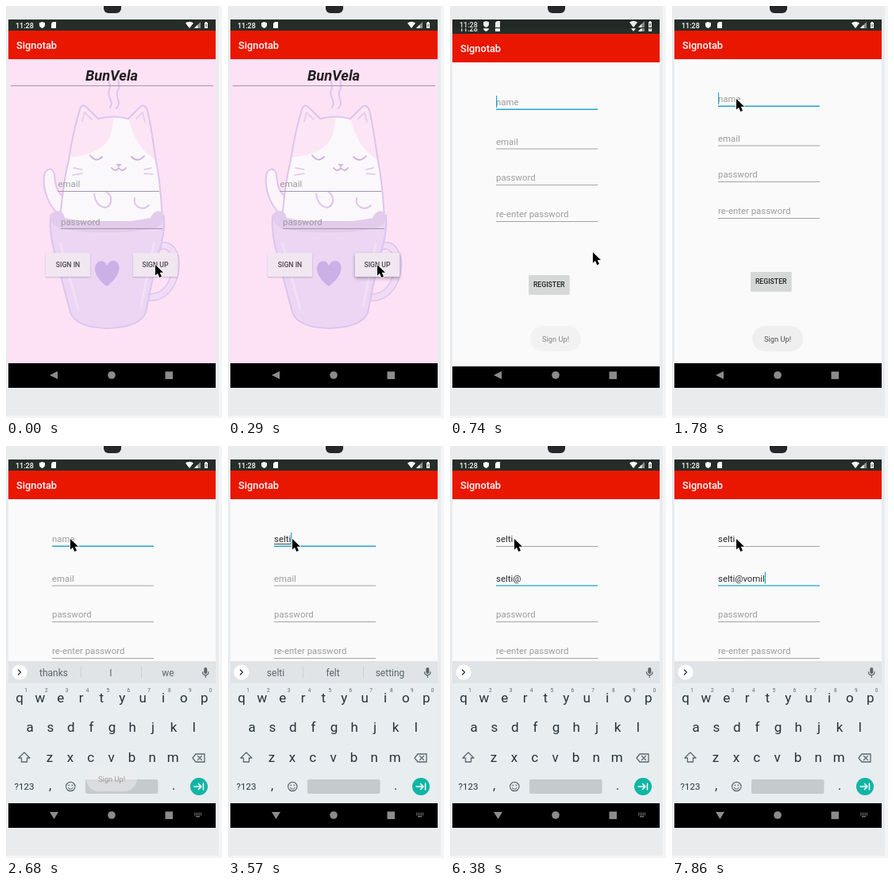
These frames come from a looping animation (272x519 px, 8000 ms). An HTML page with a canvas:

```html
<!DOCTYPE html>
<html lang="en">
<head>
<meta charset="utf-8">
<title>Sign up</title>
<style>
html, body { margin: 0; width: 100%; height: 100%; overflow: hidden; background: #ebedef; }
canvas { display: block; width: 272px; height: 519px; }
</style>
</head>
<body>
<canvas id="stage"></canvas>
<script>
const W = 272, H = 519, LOOP = 8000;
const canvas = document.getElementById('stage');
const ctx = canvas.getContext('2d');
const dpr = window.devicePixelRatio || 1;
canvas.width = W * dpr;
canvas.height = H * dpr;

const TICKS = [0, 290, 590, 740, 890, 1040, 1190, 1340, 1480, 1780, 1930, 2080,
  2380, 2530, 2680, 2830, 2980, 3120, 3270, 3420, 3570, 3860, 4310, 4600, 4750,
  4900, 5050, 5190, 5640, 5780, 6380, 6680, 7130, 7280, 7430, 7570, 7860];
const NAME = 'selti', MAIL = 'selti@vomil';
const NAME_KEYS = [2980, 3120, 3270, 3420, 3570];
const MAIL_KEYS = [4600, 4750, 4900, 5050, 5190, 5780, 6680, 7280, 7430, 7570, 7860];
const OPEN = 590, TAP = 1780, NEXT = 3860;
const ACTIONS = [OPEN, TAP, ...NAME_KEYS, NEXT, ...MAIL_KEYS];
const WORDS = ['thanks I we', 'she so said', 'see set send', 'self sell sets',
  'selt belt felt', 'selti felt setting'];
const HINT = '#9c9c9c', INK = '#263238', BLUE = '#22a6cf', TEAL = '#10b5a4';

const clamp = v => Math.max(0, Math.min(1, v));
const past = (list, t) => list.filter(k => k <= t);
const last = list => list[list.length - 1];

function rect(x, y, w, h, fill) {
  ctx.fillStyle = fill;
  ctx.fillRect(x, y, w, h);
}

function round(x, y, w, h, r, fill) {
  ctx.beginPath();
  ctx.roundRect(x, y, w, h, r);
  ctx.fillStyle = fill;
  ctx.fill();
}

function disc(x, y, r, fill) {
  ctx.beginPath();
  ctx.arc(x, y, r, 0, 7);
  ctx.fillStyle = fill;
  ctx.fill();
}

function shape(d, fill, stroke, width = 1) {
  const p = new Path2D(d);
  if (fill) { ctx.fillStyle = fill; ctx.fill(p); }
  if (stroke) {
    ctx.strokeStyle = stroke;
    ctx.lineWidth = width;
    ctx.stroke(p);
  }
}

function text(s, x, y, size, color, align = 'left', style = '400') {
  ctx.font = `${style} ${size}px Roboto, "Noto Sans", sans-serif`;
  ctx.textAlign = align;
  ctx.fillStyle = color;
  ctx.fillText(s, x, y);
  return ctx.measureText(s).width;
}

function bezel() {
  rect(0, 0, W, H, '#e9ebed');
  rect(268, 0, 4, H, '#f4f5f6');
  rect(0, 516, W, 3, '#f3f4f5');
  round(123, -6, 22, 15, 6, '#25272a');
}

function navBar(keyboard) {
  const c = '#8c8c8c';
  rect(3, 450, 261, 31, '#000');
  shape(keyboard ? 'M55 461H66L60.500 470Z' : 'M65 460V470L55 465Z', c);
  disc(133, 465, 4.8, c);
  rect(200.5, 460.5, 9.5, 9.5, c);
  if (!keyboard) return;
  for (let i = 0; i < 10; i++) {
    rect(237 + i % 5 * 2, 462 + Math.floor(i / 5) * 2, 1.2, 1.2, c);
  }
  rect(239, 466.2, 5, 1.2, c);
}

function appBar() {
  rect(3, 17, 261, 14, '#252d28');
  text('11:28', 12, 27.500, 9, '#fff', 'left', '500');
  shape('M45.500 20L49 21.300V24C49 26 47.500 27.300 45.500 28C43.500 27.300 42 26 42 24V21.300Z', '#fff');
  shape('M59 20H63V28H57V22Z', '#fff');
  shape('M226 21.500Q231 18 236 21.500L231 28Z', '#fff');
  shape('M245 20V28H237Z', '#8b918d');
  shape('M241.500 23.500V28H237Z', '#fff');
  rect(250, 21, 4, 7, '#fff');
  rect(251, 20, 2, 1, '#fff');
  rect(251.5, 23, 1, 3, '#252d28');
  rect(3, 31, 261, 36, '#e91700');
  text('Signotab', 13, 54, 12.8, '#fff', 'left', '500');
}

function catCup() {
  const line = '#dcc5ec', cup = '#ecd6f4';
  ctx.lineCap = ctx.lineJoin = 'round';
  shape('M131 128C137 120 126 114 130 106C132 101 131 98 129 94M139 129C147 121 136 114 141 106C144 101 142 97 141 93', null, line, 2);
  shape('M66 262C54 252 46 232 48 214C50 203 60 203 61 213C62 225 64 234 72 240', '#fbf4fb', line, 2);
  shape('M190 304C207 296 217 312 213 335C209 357 195 368 180 367', null, line, 10);
  shape('M190 304C207 296 217 312 213 335C209 357 195 368 180 367', null, '#f2dcf5', 7);
  const body = 'M68 272C70 240 74 215 79 194C82 174 87 150 93 130Q96 122 102 128L116 142Q135 137 154 142L168 128Q174 122 178 131C183 152 186 176 189 196C194 220 196 248 197 272Z';
  shape(body, '#fbf8fb');
  ctx.save();
  ctx.clip(new Path2D(body));
  shape('M70 110H134Q140 160 123 176Q101 192 74 190Z', '#fce5f4');
  shape('M154 110H200V199Q166 188 154 142Z', '#fce5f4');
  ctx.restore();
  shape(body, null, line, 2);
  shape('M96 145L99 134L108 143M164 142L172 134L175 146', null, '#e6d0ee', 2);
  shape('M106 188Q113 198 121 190M158 190Q166 198 174 189M133 204Q138 210 142 204Q147 210 151 204', null, '#cbb1dc', 1.800);
  shape('M138 199H146L142 203Z', '#d5b5e2');
  shape('M85 204L96 206M84 213L96 211M183 204L174 206M185 212L174 211', null, line, 1.300);
  shape('M111 237C113 255 130 259 132 246Q133 238 126 234M162 242C160 253 172 259 180 251', null, line, 2);
  shape('M56 264Q127 286 199 264Q201 289 190 317L176 386Q169 405 127 406Q88 405 81 386L63 317Q54 287 56 264Z', cup, line, 2);
  shape('M55 264C62 255 72 256 74 267Q127 278 182 267C188 254 198 257 199 267Q197 279 182 281Q127 290 72 281Q57 278 55 264Z', '#e3cbed');
  shape('M69 300L91 382M186 300L170 378', null, '#f2e0f7', 3);
  shape('M127 353C111 342 108 327 117 322Q124 319 127 327Q132 318 139 322C147 329 141 343 127 353Z', '#cbb0e7');
}

function loginButton(label, x, pressed) {
  ctx.save();
  ctx.shadowColor = `rgba(60,40,70,${pressed ? .42 : .26})`;
  ctx.shadowBlur = (pressed ? 4 : 2) * dpr;
  ctx.shadowOffsetY = (pressed ? 2 : 1) * dpr;
  round(x, 311, 56, 30, 1, '#f0e7f1');
  ctx.restore();
  text(label, x + 28, 329, 8.700, '#4b474c', 'center', '500');
}

function loginScreen(t) {
  rect(3, 67, 261, 384, '#fde2f6');
  catCup();
  text('BunVela', 133, 94, 18.300, '#211e22', 'center', 'italic 700');
  rect(6, 100, 255, 1, '#a694a3');
  text('email', 65.500, 228, 11.400, HINT);
  rect(65, 233, 128, 1, '#a596a4');
  text('password', 69, 276, 11.400, HINT);
  rect(69, 280, 128, 1, '#a596a4');
  loginButton('SIGN IN', 50, false);
  loginButton('SIGN UP', 160, t >= 290);
  appBar();
}

function field(hint, value, y, focused, caret, composing) {
  const w = text(value || hint, 58, y - 5, 11.400, value ? '#2b2b2b' : HINT);
  const end = value ? w : 0;
  if (composing && value) rect(58, y - 3, w, 1, '#444');
  rect(58, y, 128, 1, focused ? BLUE : '#a3a3a3');
  if (focused) rect(58, y - .5, 128, .5, BLUE);
  if (focused && caret) rect(58 + end, y - 17, 1.200, 15, BLUE);
}

function formScreen(t) {
  const name = NAME.slice(0, past(NAME_KEYS, t).length);
  const mail = MAIL.slice(0, past(MAIL_KEYS, t).length);
  const idle = t - (last(past(ACTIONS, t)) || 0);
  const caret = Math.floor((idle + 60) / 500) % 2 === 0;
  const onMail = t >= NEXT;
  rect(3, 67, 261, 383, '#fafafa');
  field('name', name, 126, !onMail, caret, !onMail);
  field('email', mail, 175.500, onMail, caret, t < 5780);
  field('password', '', 221, false);
  field('re-enter password', '', 267, false);
  round(99, 335.500, 51.500, 24.500, 1, 'rgba(0,0,0,.12)');
  round(99, 335, 51.500, 24, 1, '#d6d7d7');
  text('REGISTER', 124.700, 350, 8.700, '#222', 'center', '500');
  appBar();
}

function suggestions(t) {
  if (t < 2380 || (t >= NEXT && t < 4600) || t >= 5780) return;
  if (t >= 4600 && t < 4750) {
    text("What's new in Nuboki?", 132.500, 289, 10.500, TEAL, 'center');
    return;
  }
  const n = past(t < NEXT ? NAME_KEYS : MAIL_KEYS, t).length;
  WORDS[n].split(' ').forEach((w, i) => text(w, 60 + i * 72, 289.500, 12, '#59666c', 'center'));
  rect(94, 278, 1, 14, '#c9cfd2');
  rect(170, 278, 1, 14, '#c9cfd2');
}

function keyRow(keys, x, y) {
  [...keys].forEach((k, i) => text(k, x + i * 25.850, y, 17, INK, 'center'));
}

function keyboard(t) {
  const up = 1 - Math.pow(1 - clamp((t - TAP) / 300), 2);
  if (!up) return;
  const grey = '#5a676d';
  ctx.save();
  ctx.beginPath();
  ctx.rect(3, 67, 261, 383);
  ctx.clip();
  ctx.translate(0, 179 * (1 - up));
  rect(3, 271, 261, 179, '#e8edf0');
  rect(3, 271, 261, 28, '#e0e4e7');
  disc(17, 285, 9.500, '#fff');
  shape('M15.500 282L18.500 285L15.500 288', null, INK, 1.300);
  suggestions(t);
  round(249.300, 279, 4, 8, 2, grey);
  shape('M247.500 284.500C247.500 290 255 290 255 284.500M251.300 289V291.500', null, grey, 1.200);

  keyRow('qwertyuiop', 17, 323);
  for (let i = 0; i < 10; i++) text((i + 1) % 10, 25 + i * 25.850, 310, 6.500, grey, 'center');
  keyRow('asdfghjkl', 30, 360);
  keyRow('zxcvbnm', 55, 398);
  shape('M23 386L30 393H26.500V398H19.500V393H16Z', null, grey, 1.300);
  shape('M235 393L239 388H250V398H239ZM241.500 390.500L246.500 395.500M246.500 390.500L241.500 395.500', null, grey, 1.300);
  text('?123', 23, 433, 11.500, INK, 'center');
  text(',', 55.500, 433, 16, INK, 'center');
  text('.', 211, 433, 16, INK, 'center');
  shape('M87 429A5.700 5.700 0 1 1 75.600 429A5.700 5.700 0 1 1 87 429M78.500 430.500Q81.300 434 84 430.500', null, grey, 1.200);
  disc(79.300, 427.300, .9, grey);
  disc(83.300, 427.300, .9, grey);
  round(100, 420, 91.500, 18, 2, '#c5cacd');
  disc(243, 429, 11, TEAL);
  shape('M237 429H246M242.500 425.500L246 429L242.500 432.500M248.500 425V433', null, '#fff', 1.500);
  ctx.restore();
}

function toast(t) {
  const a = Math.min(clamp((t - 500) / 350), clamp(1 - (t - 2530) / 300));
  if (!a) return;
  ctx.globalAlpha = a;
  round(101, 403, 64, 32, 16, '#efefef');
  text('Sign Up!', 133, 422.500, 9.300, '#505050', 'center');
  ctx.globalAlpha = 1;
}

function pointer(t) {
  const p = clamp((t - OPEN) / 890), e = p * p * (3 - 2 * p);
  ctx.save();
  ctx.translate(188 - 107 * e, 326 - 209 * e);
  ctx.lineJoin = 'round';
  shape('M0 0V13.500L3 10.700L5.300 16L8 14.800L5.700 9.800H10Z', '#000', '#fff', 1.600);
  shape('M0 0V13.500L3 10.700L5.300 16L8 14.800L5.700 9.800H10Z', '#000');
  ctx.restore();
}

function opening(t) {
  const left = clamp(1 - (t - OPEN) / 300);
  if (left > 0) {
    ctx.save();
    ctx.beginPath();
    ctx.rect(3, 17, 261, 433);
    ctx.clip();
    ctx.translate(0, -1);
    loginScreen(t);
    rect(3, 17, 261, 434, 'rgba(0,0,0,.08)');
    ctx.restore();
  }
  const top = 17 + 179 * Math.pow(left, 4);
  ctx.save();
  ctx.beginPath();
  ctx.rect(3, top, 261, 481 - top);
  ctx.clip();
  ctx.translate(0, 16 * left * left);
  formScreen(t);
  ctx.restore();
}

function draw(t) {
  ctx.setTransform(dpr, 0, 0, dpr, 0, 0);
  bezel();
  navBar(t > TAP);
  if (t < OPEN) {
    loginScreen(t);
    rect(3, 450, 261, 1, '#000');
  } else {
    opening(t);
    keyboard(t);
    toast(t);
  }
  pointer(t);
}

function frame() {
  draw(last(past(TICKS, performance.now() % LOOP)));
  requestAnimationFrame(frame);
}
frame();
</script>
</body>
</html>
```
